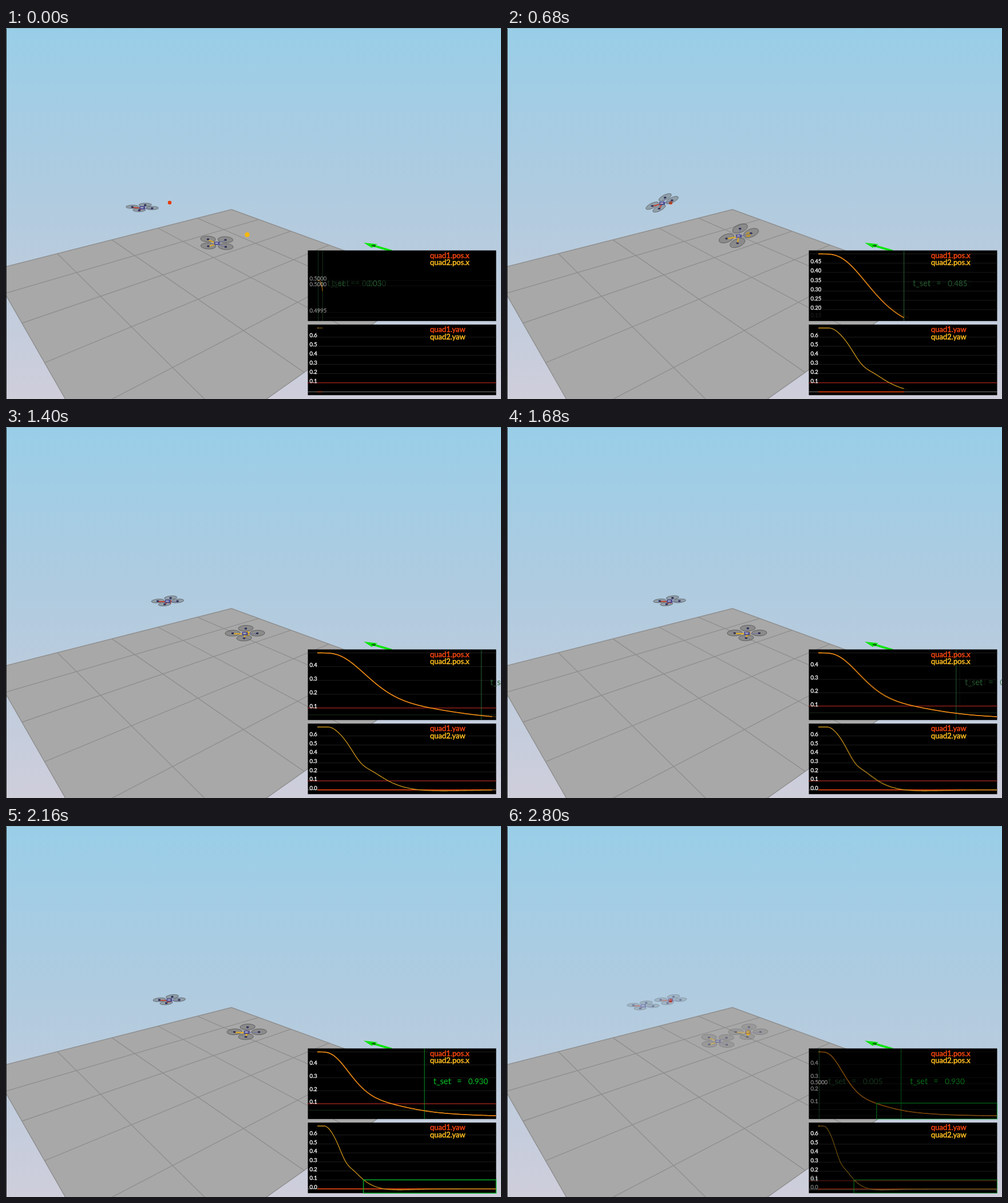
An HTML page with a canvas that plays this animation: 865x648 px, repeating every 2.84 s.

```html
<!DOCTYPE html>
<html lang="en">
<head>
<meta charset="utf-8">
<title>Quadrotor step response</title>
<style>
  html, body { margin: 0; width: 100%; height: 100%; overflow: hidden; }
  canvas { display: block; }
</style>
</head>
<body>
<canvas id="stage" width="865" height="648"></canvas>
<script>
const W = 865, H = 648, FRAME_MS = 40, FRAMES = 71, STATES = 76;
const RED = '#f5450f', YELLOW = '#fdbb1e', GREEN = '#00b42d';
const LIMIT = .1, SETTLE = .93, HOLD = 1;
const { exp, sin, cos, max, min, abs, floor, ceil } = Math;
const screen = document.getElementById('stage').getContext('2d');
const layer = document.createElement('canvas');
layer.width = W;
layer.height = H;
const layerCtx = layer.getContext('2d');

const bell = (t, center, width) => exp(-(((t - center) / width) ** 2));

// Third-order step response from 0.5 to 0 with a soft start.
function pos(t) {
  const swing = exp(-5.9 * t) * cos(10.3 * t + .42) / cos(.42);
  const response = 1.35 * exp(-2.92 * t) - .35 * swing;
  return .5 - .5 * (1 - response) * (1 - exp(-((t / .05) ** 4)));
}

// Delayed, slightly overshooting response from 0.7 to 0.
function yaw(t) {
  const s = max(0, t - .06), a = 6.3, w = 4.8;
  const response = exp(-a * s) * (cos(w * s) + a / w * sin(w * s));
  return .7 * (response - .08 * bell(t, .245, .064));
}

// Lean forward to accelerate, then back to brake.
const tilt = t => 4 * bell(t, .12, .09) - 5 * bell(t, .47, .13);

const quads = [
  { x: 238, y: 313.4, dx: 48, dy: -10.1, color: '#c8402a', p: [17.3, 0], q: [5.2, -5.5], heading: t => 0 },
  { x: 368.5, y: 375.3, dx: 53, dy: -16, color: '#e8b01c', p: [21.5, 0], q: [1.5, -8.5], heading: yaw },
];

function line(g, x1, y1, x2, y2, color, width = 1) {
  g.strokeStyle = color;
  g.lineWidth = width;
  g.beginPath();
  g.moveTo(x1, y1);
  g.lineTo(x2, y2);
  g.stroke();
}

function polygon(g, points, color) {
  g.fillStyle = color;
  g.beginPath();
  points.forEach(p => g.lineTo(...p));
  g.closePath();
  g.fill();
}

function dot(g, x, y, r, color) {
  g.fillStyle = color;
  g.beginPath();
  g.arc(x, y, r, 0, 7);
  g.fill();
}

function text(g, str, x, y, size, color, bold = 0) {
  g.font = `${size}px Lato, sans-serif`;
  g.fillStyle = g.strokeStyle = color;
  g.fillText(str, x, y);
  if (bold) {
    g.lineWidth = bold;
    g.strokeText(str, x, y);
  }
}

// Perspective position of a floor grid node.
function floorPoint(a, b) {
  const w = 1 - .0673 * a - .0732 * b;
  return [(394 - 82.12 * a + 15.5 * b) / w, (317 - 7.27 * a - 7.05 * b) / w];
}

function drawWorld(g) {
  const sky = g.createLinearGradient(0, 0, 0, H);
  sky.addColorStop(0, '#99cee8');
  sky.addColorStop(.48, '#b1cbdf');
  sky.addColorStop(1, '#cfcedb');
  g.fillStyle = sky;
  g.fillRect(0, 0, W, H);
  polygon(g, [floorPoint(0, 0), floorPoint(5, 0), floorPoint(5, 5), floorPoint(0, 5)], '#a8a8a8');
  for (let i = 0; i <= 5; i++) {
    line(g, ...floorPoint(i, 0), ...floorPoint(i, 5), '#8f8f8f', 1.4);
    line(g, ...floorPoint(0, i), ...floorPoint(5, i), '#8f8f8f', 1.4);
  }
  line(g, .5, 0, .5, H, '#222');
  line(g, 0, .5, W, .5, '#8fb4c6');
  line(g, 640, 379.5, 674, 389.5, '#0be60b', 3.5);
  polygon(g, [[625, 375], [649, 377.5], [639, 384]], '#0be60b');
  line(g, 639, 380, 646, 380.5, '#0a5a0a', 2);
  line(g, 643, 378, 643, 383, '#0a5a0a', 1.2);
  dot(g, 286, 305, 3.2, '#e63c0d');
  dot(g, 421.5, 361, 4.3, '#f6b70c');
}

function drawQuad(g, quad, t) {
  const done = max(0, 1 - pos(t) / .5), angle = quad.heading(t), lean = tilt(t);
  const x = quad.x + quad.dx * done, y = quad.y + quad.dy * done ** .65;
  const c = cos(angle), s = sin(angle);
  const [px, py] = quad.p.map((v, i) => v * c - quad.q[i] * s + i * lean);
  const [qx, qy] = quad.q.map((v, i) => v * c + quad.p[i] * s + i * lean * .85);
  const tips = [[-1, 0], [0, 1], [1, 0], [0, -1]]
    .map(([a, b]) => [x + a * px + b * qx, y + a * py + b * qy]);

  for (const [tx, ty] of tips) {
    g.save();
    g.transform(px, py, qx, qy, tx, ty);
    g.beginPath();
    g.arc(0, 0, .61, 0, 7);
    g.restore();
    g.fillStyle = 'rgba(100,100,100,.42)';
    g.fill();
    g.strokeStyle = 'rgba(65,65,65,.7)';
    g.lineWidth = .9;
    g.stroke();
  }
  tips.forEach(([tx, ty], i) => {
    const front = i === 0 || i === 3;
    line(g, x, y + 1.5, tx, ty + 1, front ? quad.color : '#74769c', front ? 1.9 : 1.3);
    g.fillStyle = '#2c2c58';
    g.fillRect(tx - 2, ty - 1, 4, 2.8);
  });
  g.fillStyle = '#4c4c90';
  g.fillRect(x - 5, y - 2, 10, 5.5);
  g.fillStyle = '#b4b4cc';
  g.fillRect(x - 3, y - .5, 5, 2);
}

// Finest 1-or-5 step whose grid lines stay readable.
function gridStep(scale) {
  for (let e = -5; ; e++)
    for (const m of [1, 5]) {
      const step = m * 10 ** e;
      if (step * scale >= 14.5) return { step, digits: max(1, -e) };
    }
}

function drawPlot(g, T, { top, name, value, crossing, flat, cursor }) {
  const left = 527.5, right = 856.5, height = 123.3, x0 = 544;
  const base = top + 6, span = 111.5, bottom = base + span;
  const rate = 312 / max(T, 1.011);
  const samples = Array.from({ length: 161 }, (_, i) => [T * i / 160, value(T * i / 160)]);
  const values = samples.map(s => s[1]);
  if (flat) values.push(0);
  const high = max(...values), low = min(...values);
  const mid = (high + low) / 2, half = max((high - low) / 2, .0005);
  const scale = span / (2 * half);
  const X = t => x0 + t * rate, Y = v => base + (mid + half - v) * scale;
  const visible = v => Y(v) > base && Y(v) < bottom;
  const settled = T > crossing + HOLD;
  const rule = (v, color, width) => line(g, left, Y(v), right, Y(v), color, width);

  g.fillStyle = '#000';
  g.fillRect(left, top, right - left, height);
  const { step, digits } = gridStep(scale);
  const ticks = [];
  for (let i = ceil((mid - half) / step - 1e-6); i * step <= mid + half + 1e-9; i++)
    ticks.push(i * step);
  for (const v of ticks) rule(v, flat && abs(v) < 1e-9 ? '#777' : '#1d1d1d');
  if (visible(LIMIT) && !settled) rule(LIMIT, '#a8231c', 1.2);

  const shown = min(T, SETTLE), held = T > 1.43;
  if (cursor) {
    if (visible(LIMIT / 2)) rule(LIMIT / 2, '#1c2e1c');
    line(g, X(shown), top, X(shown), top + height, held ? '#0b9a2a' : '#2a6535', 1.1);
  }

  const trace = (f, color, width) => {
    g.strokeStyle = color;
    g.lineWidth = width;
    g.beginPath();
    samples.forEach(([t, v]) => g.lineTo(X(t), Y(f(v))));
    g.stroke();
  };
  trace(v => flat ? 0 : v, RED, 1.5);
  trace(v => v, flat ? '#cf961b' : '#e39a16', 1.3);

  if (settled && visible(LIMIT)) {
    g.strokeStyle = GREEN;
    g.lineWidth = 1.4;
    g.strokeRect(X(crossing), Y(LIMIT), right - X(crossing), top + height - Y(LIMIT));
  }
  for (const v of ticks)
    if (Y(v) < bottom - 1.2 && Y(v) > base + 8)
      text(g, abs(v).toFixed(digits), 530.5, Y(v) + .3, 9.5, '#fff', .35);

  text(g, 'quad1.' + name, 741, top + 13, 13, RED, .5);
  text(g, 'quad2.' + name, 741, top + 25.5, 13, YELLOW, .5);
  if (cursor) {
    const tx = X(shown) + 15.5, color = held ? '#08d62c' : '#2a6535';
    text(g, 't_set', tx, 451, 14.5, color);
    text(g, '=', tx + 41, 451, 14.5, color);
    text(g, shown.toFixed(3), tx + 61, 451, 13.5, color);
  }
}

function drawState(g, k) {
  const T = floor((.005 + k / 37.5) / .005 + 1e-6) * .005;
  drawWorld(g);
  quads.forEach(q => drawQuad(g, q, T));
  drawPlot(g, T, { top: 388.5, name: 'pos.x', value: pos, crossing: .654, cursor: true });
  drawPlot(g, T, { top: 518, name: 'yaw', value: yaw, crossing: .4, flat: true });
}

// Displayed frame -> fractional simulation state; neighbours are cross-faded.
const stateAt = n => .5 + n + 5 * (n / (FRAMES - 1)) ** 1.5;

let last = -1;
function tick() {
  const n = floor(performance.now() / FRAME_MS) % FRAMES;
  if (n !== last) {
    last = n;
    const u = stateAt(n), k = floor(u);
    drawState(screen, k);
    drawState(layerCtx, (k + 1) % STATES);
    screen.globalAlpha = u - k;
    screen.drawImage(layer, 0, 0);
    screen.globalAlpha = 1;
  }
  requestAnimationFrame(tick);
}
tick();
</script>
</body>
</html>
```
